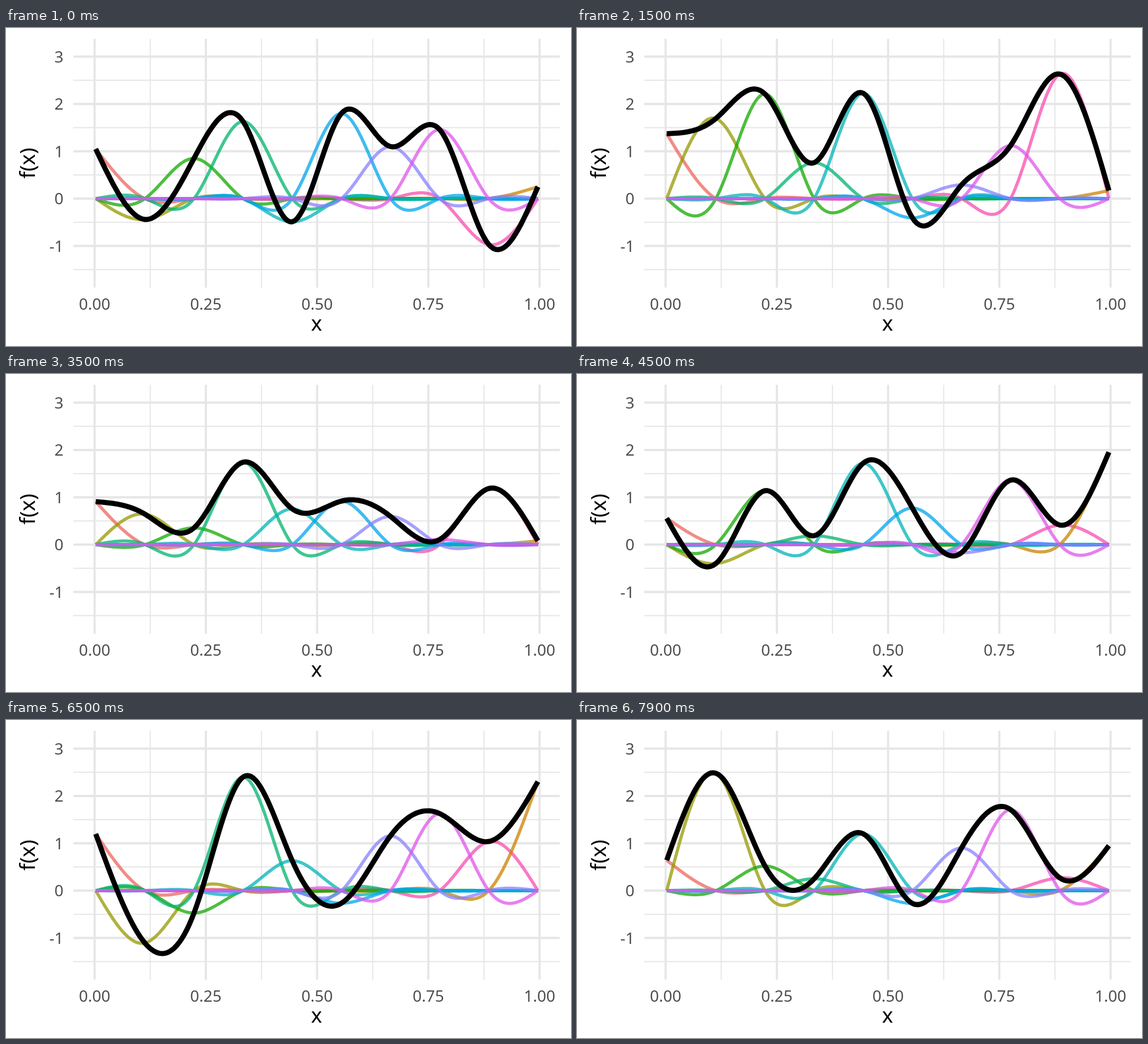
Animation of 998x561 px, one loop 8000 ms. Source, as an HTML page with a canvas:

```html
<!DOCTYPE html>
<html lang="en">
<head>
<meta charset="utf-8">
<title>Spline basis functions</title>
<style>
  html, body { margin: 0; width: 100%; height: 100%; overflow: hidden; background: #fff; }
  canvas { display: block; }
</style>
</head>
<body>
<canvas id="stage" width="998" height="561"></canvas>
<script>
const ctx = document.getElementById('stage').getContext('2d');

const LOOP = 8000, STEP = 100, HOLD = 300, MOVE = 1000;
const KNOTS = 10, SAMPLES = 20, MEAN = 0.9;
const LEFT = 158.5, RIGHT = 939.5;

const range = n => Array.from({ length: n }, (_, i) => i);
const px = x => 156.5 + x * 786;
const py = y => 301 - y * 83.5;

// Heights between -0.45 and 2.05, spread by the golden ratio
const scatter = range(KNOTS).map(k => 2.5 * ((0.4 + k * 0.618) % 1) - 0.45);
const spread = (heights, amount) => heights.map(h => MEAN + (h - MEAN) * amount);

// Key points: the height of the sum at each knot
const finale = [0.64, 2.48, 0.52, 0.25, 1.2, -0.27, 0.9, 1.71, 0.27, 0.95];
const STATES = [
  [1.05, -0.44, 0.85, 1.63, -0.49, 1.8, 1.1, 1.46, -0.97, 0.25],
  [1.38, 1.69, 2.22, 0.76, 2.24, -0.41, 0.28, 1.12, 2.64, 0.16],
  [-0.19, 2.09, 0.56, 0.52, -0.28, 0.47, 2.04, 1.59, 1.29, 2.08],
  [0.91, 0.65, 0.35, 1.75, 0.75, 0.92, 0.6, 0.1, 1.19, 0.07],
  scatter,
  [2.01, 0.81, 1.03, 0.73, 0.22, 0.38, 1.52, 1.03, 1.25, 1.36],
  [1.2, -1.12, -0.48, 2.41, 0.63, -0.27, 1.16, 1.63, 1.04, 2.31],
  spread(finale, 0.4),
  spread(finale, 1.118)
];

// Evenly spaced hues in polar CIE Luv, converted to sRGB
function hueColor(degrees, chroma = 105, light = 60) {
  const h = degrees * Math.PI / 180;
  const u = chroma * Math.cos(h) / (13 * light) + 0.1978;
  const v = chroma * Math.sin(h) / (13 * light) + 0.4683;
  const Y = ((light + 16) / 116) ** 3;
  const X = Y * 9 * u / (4 * v);
  const Z = Y * (12 - 3 * u - 20 * v) / (4 * v);
  const rgb = [
    3.2405 * X - 1.5371 * Y - 0.4985 * Z,
    -0.9693 * X + 1.876 * Y + 0.0416 * Z,
    0.0556 * X - 0.204 * Y + 1.0572 * Z
  ].map(c => {
    const gamma = c > 0.0031 ? 1.055 * c ** (1 / 2.4) - 0.055 : 12.92 * c;
    return Math.round(255 * Math.min(1, Math.max(0, gamma)));
  });
  return `rgb(${rgb})`;
}

// Natural cubic spline through unit-spaced knots, sampled evenly
function spline(y) {
  const n = y.length, c = Array(n).fill(0), d = Array(n).fill(0), m = Array(n).fill(0);
  for (let i = 1; i < n - 1; i++) {
    const pivot = 4 - c[i - 1];
    c[i] = 1 / pivot;
    d[i] = (6 * (y[i - 1] - 2 * y[i] + y[i + 1]) - d[i - 1]) / pivot;
  }
  for (let i = n - 2; i > 0; i--) m[i] = d[i] - c[i] * m[i + 1];

  return range((n - 1) * SAMPLES + 1).map(s => {
    const i = Math.min(n - 2, Math.floor(s / SAMPLES));
    const b = s / SAMPLES - i, a = 1 - b;
    return a * y[i] + b * y[i + 1] + ((a ** 3 - a) * m[i] + (b ** 3 - b) * m[i + 1]) / 6;
  });
}

// Hues and layers both follow the alphabetical order 1, 10, 2, ... 9
const names = range(KNOTS).map(k => k + 1).sort();
const LAYERS = names.map(rank => {
  const knot = names[rank - 1] - 1;
  return {
    knot,
    color: hueColor(15 + (rank - 1) * 360 / KNOTS),
    basis: spline(range(KNOTS).map(k => +(k === knot)))
  };
});

const quinticInOut = p => p < 0.5 ? 16 * p ** 5 : 1 - 16 * (1 - p) ** 5;

function weightsAt(time) {
  const pos = Math.max(0, (time - HOLD) / MOVE);
  const i = Math.floor(pos);
  const e = quinticInOut(pos - i);
  return STATES[i].map((w, k) => w + (STATES[i + 1][k] - w) * e);
}

function line(x1, y1, x2, y2) {
  ctx.beginPath();
  ctx.moveTo(x1, y1);
  ctx.lineTo(x2, y2);
  ctx.stroke();
}

function grid(xs, ys, width) {
  ctx.strokeStyle = '#e6e6e6';
  ctx.lineWidth = width;
  for (const y of ys) line(119, py(y), 978, py(y));
  for (const x of xs) line(px(x), 19, px(x), 458);
}

function drawAxes() {
  const xs = range(5).map(i => i / 4), ys = range(5).map(i => i - 1);
  grid(xs.slice(0, -1).map(x => x + 0.125), ys.map(y => y - 0.5), 1.9);
  grid(xs, ys, 3.8);

  ctx.font = '28px "Noto Sans", "Open Sans", sans-serif';
  ctx.fillStyle = '#4d4d4d';
  ctx.textAlign = 'right';
  for (const y of ys) ctx.fillText(y, 101.5, py(y) + 10);
  ctx.textAlign = 'center';
  for (const x of xs) ctx.fillText(x.toFixed(2), px(x), 497);

  ctx.font = '37px "Noto Sans", "Open Sans", sans-serif';
  ctx.fillStyle = '#000';
  ctx.fillText('x', 548.5, 534);
  ctx.save();
  ctx.translate(50.5, 238.5);
  ctx.rotate(-Math.PI / 2);
  ctx.fillText('f(x)', 0, 0);
  ctx.restore();
}

function curve(values, color, width) {
  const dx = (RIGHT - LEFT) / (values.length - 1);
  ctx.strokeStyle = color;
  ctx.lineWidth = width;
  ctx.beginPath();
  values.forEach((v, i) => ctx.lineTo(LEFT + i * dx, py(v)));
  ctx.stroke();
}

function draw(time) {
  const weights = weightsAt(time);
  ctx.fillStyle = '#fff';
  ctx.fillRect(0, 0, 998, 561);
  ctx.lineJoin = 'round';
  drawAxes();
  ctx.globalAlpha = 0.75;
  for (const { knot, color, basis } of LAYERS) {
    curve(basis.map(v => v * weights[knot]), color, 5.6);
  }
  ctx.globalAlpha = 1;
  curve(spline(weights), '#000', 9);
}

const start = performance.now();
function tick() {
  const time = (performance.now() - start) % LOOP;
  draw(Math.floor(time / STEP) * STEP);
  requestAnimationFrame(tick);
}
tick();
</script>
</body>
</html>
```
